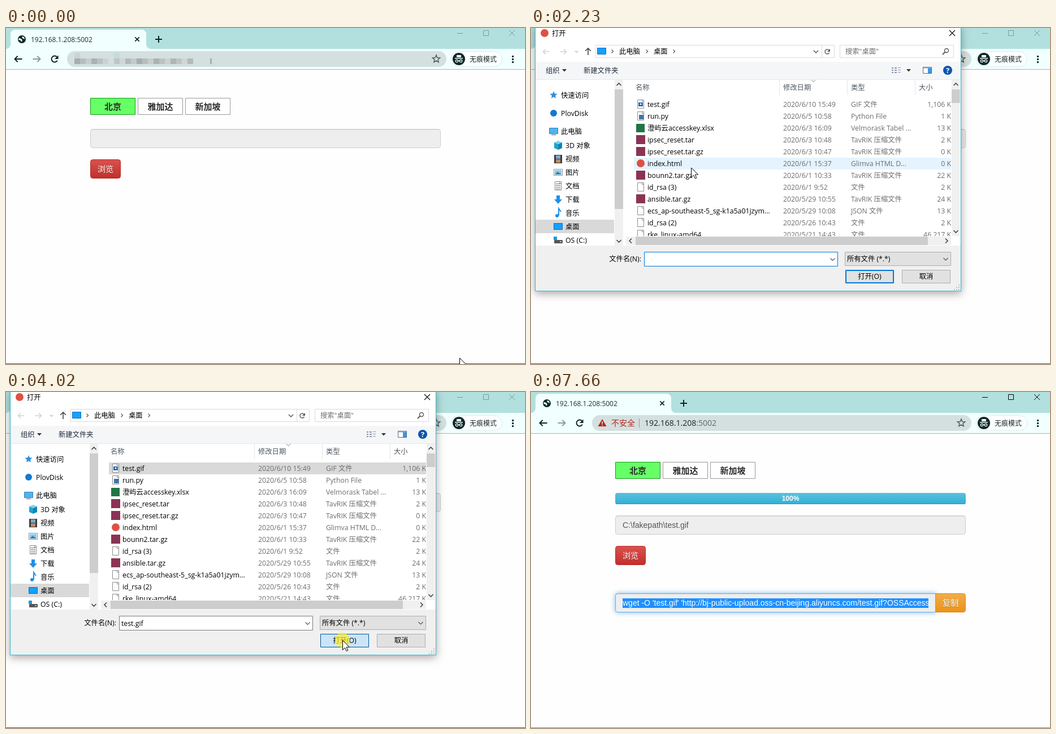
An HTML page with a canvas that plays this animation: 918x596 px, repeating every 8 s.

```html
<!DOCTYPE html>
<html lang="zh">
<head>
<meta charset="utf-8">
<style>
html, body { margin: 0; width: 100%; height: 100%; overflow: hidden; background: #fefefe; }
canvas { display: block; }
</style>
</head>
<body>
<canvas id="stage" width="918" height="596"></canvas>
<script>
const g = document.getElementById('stage').getContext('2d');
const UI = '"Open Sans", "Noto Sans CJK SC", "Noto Sans CJK", sans-serif';
const WEB = '"Liberation Sans", "Noto Sans CJK SC", "Noto Sans CJK", sans-serif';
const LOOP = 8000;
const T = { press: 680, open: 1210, built: 1840, icons: 2000, select: 2850, confirm: 3940, close: 4100,
  upload: 5110, fill: 5260, link: 5950, copy: 6840, copied: 6970, gone: 7640 };
const PATH = [[0, 802, 585], [60, 802, 585], [510, 190, 252], [1140, 190, 252], [1740, 279, 278],
  [1980, 279, 278], [2770, 296, 150], [2850, 297, 138], [3200, 297, 138], [3800, 602, 464],
  [3960, 595, 440], [4100, 595, 440], [4400, 598, 457], [6090, 598, 457], [6420, 683, 419],
  [6800, 738, 374], [7080, 738, 374], [7600, 715, 452], [LOOP, 715, 452]];
const CLICKS = [[680, 940], [2850, 3220], [3940, 4150], [6840, 7020]];

const PACK = 'TavRIK 压缩文件';
const FILES = [
  ['test.gif', '2020/6/10 15:49', 'GIF 文件', '1,106', 'image'],
  ['run.py', '2020/6/5 10:58', 'Python File', '1', 'script'],
  ['澄屿云accesskey.xlsx', '2020/6/3 16:09', 'Velmorask Tabel ...', '13', 'sheet'],
  ['ipsec_reset.tar', '2020/6/3 10:48', PACK, '2', 'pack'],
  ['ipsec_reset.tar.gz', '2020/6/3 10:47', PACK, '0', 'pack'],
  ['index.html', '2020/6/1 15:37', 'Glimva HTML D...', '0', 'web'],
  ['bounn2.tar.gz', '2020/6/1 10:33', PACK, '22', 'pack'],
  ['id_rsa (3)', '2020/6/1 9:52', '文件', '2', 'page'],
  ['ansible.tar.gz', '2020/5/29 10:55', PACK, '24', 'pack'],
  ['ecs_ap-southeast-5_sg-k1a5a01jzym...', '2020/5/29 10:08', 'JSON 文件', '13', 'page'],
  ['id_rsa (2)', '2020/5/26 10:43', '文件', '2', 'page'],
  ['rke_linux-amd64', '2020/5/21 14:43', '文件', '46,217', 'page']];
const PLACES = [['快速访问', 'star'], ['PlovDisk', 'cloud'], ['此电脑', 'screen'], ['3D 对象', 'cube'],
  ['视频', 'film'], ['图片', 'photo'], ['文档', 'doc'], ['下载', 'down'], ['音乐', 'note'],
  ['桌面', 'desk'], ['OS (C:)', 'disk'], ['WORK (D:)', 'disk'], ['网络', 'screen']];

const clamp = v => Math.max(0, Math.min(1, v));

function box(x, y, w, h, fill, stroke, r = 0) {
  const i = stroke ? .5 : 0;
  g.beginPath();
  g.roundRect(x + i, y + i, w - 2 * i, h - 2 * i, r);
  if (fill) { g.fillStyle = fill; g.fill(); }
  if (stroke) { g.strokeStyle = stroke; g.lineWidth = 1; g.stroke(); }
}
function disc(x, y, r, fill) {
  g.beginPath();
  g.arc(x, y, r, 0, 7);
  g.fillStyle = fill;
  g.fill();
}
function trace(pts) {
  g.beginPath();
  for (let i = 0; i < pts.length; i += 2) g.lineTo(pts[i], pts[i + 1]);
}
function line(color, width, ...pts) {
  trace(pts);
  g.strokeStyle = color;
  g.lineWidth = width;
  g.stroke();
}
function poly(color, ...pts) {
  trace(pts);
  g.closePath();
  g.fillStyle = color;
  g.fill();
}
function text(s, x, y, color = '#000', size = 12.3, font = UI, weight = 400, align = 'left') {
  g.font = `${weight} ${size}px ${font}`;
  g.textAlign = align;
  g.fillStyle = color;
  g.fillText(s, x, y);
}
function chevron(x, y, dx, dy, s, color, w = 1.2) {
  const bx = x - dx * s / 2, by = y - dy * s / 2;
  line(color, w, bx + dy * s, by + dx * s, x + dx * s / 2, y + dy * s / 2, bx - dy * s, by - dx * s);
}
function cross(x, y, s, color, w) {
  line(color, w, x - s, y - s, x + s, y + s);
  line(color, w, x - s, y + s, x + s, y - s);
}
function arrow(x, y, dx, dy, s, color, w) {
  line(color, w, x - dx * s, y - dy * s, x + dx * s, y + dy * s);
  chevron(x + dx * s * .6, y + dy * s * .6, dx, dy, s * .8, color, w);
}
function reload(x, y, r, color, w) {
  g.beginPath();
  g.arc(x, y, r, .5, 5.5);
  g.strokeStyle = color;
  g.lineWidth = w;
  g.stroke();
  poly(color, x + r + 1, y - r - 1, x + r + 1, y, x, y);
}
function star(x, y, r, fill, stroke) {
  const pts = [];
  for (let i = 0; i < 10; i++) {
    const a = i * Math.PI / 5 - Math.PI / 2, q = i % 2 ? r * .45 : r;
    pts.push(x + q * Math.cos(a), y + q * Math.sin(a));
  }
  if (fill) poly(fill, ...pts);
  else line(stroke, 1.6, ...pts, ...pts.slice(0, 4));
}
function shade(y, h, a, b, from = 0) {
  const s = g.createLinearGradient(0, y - from, 0, y + h - from);
  s.addColorStop(0, a);
  s.addColorStop(1, b);
  return s;
}
function clipped(x, y, w, h, draw) {
  g.save();
  g.beginPath();
  g.rect(x, y, w, h);
  g.clip();
  draw();
  g.restore();
}

function cursorAt(t) {
  const i = PATH.findIndex((p, k) => t < PATH[k + 1][0]);
  const [t0, x0, y0] = PATH[i], [t1, x1, y1] = PATH[i + 1];
  const u = (t - t0) / (t1 - t0), e = u * u * (3 - 2 * u);
  return { x: x0 + (x1 - x0) * e, y: y0 + (y1 - y0) * e };
}
const inside = (c, x, y, w, h) => c.x >= x && c.x < x + w && c.y >= y && c.y < y + h;

function browser(active, secure) {
  const ink = '#062523';
  box(0, 0, 918, 37, '#b2e0de');
  g.beginPath();
  g.moveTo(0, 37);
  g.arcTo(8, 37, 8, 29, 8);
  g.arcTo(8, 3, 16, 3, 8);
  g.arcTo(248, 3, 248, 11, 8);
  g.arcTo(248, 37, 256, 37, 8);
  g.fillStyle = '#f1fffe';
  g.fill();
  box(0, 37, 918, 36, '#f1fffe');
  box(0, 73, 918, 1, '#a9b6b5');
  disc(28, 20, 7, ink);
  poly('#f1fffe', 23, 18, 27, 19, 29, 22, 27, 25, 26, 22, 22, 21);
  poly('#f1fffe', 28, 15, 32, 16, 33, 20, 29, 18);
  text('192.168.1.208:5002', 44, 25, '#1b3130', 12);
  cross(232, 20, 3.7, ink, 1.7);
  line(ink, 2, 264, 20, 276, 20);
  line(ink, 2, 270, 14, 270, 26);

  arrow(22, 55, -1, 0, 6.5, ink, 2);
  arrow(54, 55, 1, 0, 6.5, '#8e9b9a', 2);
  reload(86, 55, 5.5, ink, 2);
  box(108, 41, 671, 28, '#d4e0df', null, 14);
  if (secure) {
    poly('#b3261e', 126, 48, 133.5, 61, 118.5, 61);
    box(125.2, 52.5, 1.6, 4, '#fff');
    box(125.2, 58, 1.6, 1.6, '#fff');
    text('不安全', 142, 60, '#b3261e', 14);
    box(191, 47, 1, 16, '#8f9c9b');
    text('192.168.1.208', 201, 60, '#182423', 14);
    const w = g.measureText('192.168.1.208').width;
    text(':5002', 201 + w, 60, '#5d6968', 14);
  } else {
    for (let i = 0; i < 21; i++) {
      const v = 168 + (i * 37 % 11) * 4;
      if (i !== 6) box(121 + i * 10, 54, 10, 10, `rgb(${v},${v + 5},${v + 6})`);
    }
    box(121, 44, 10, 10, '#c8d5d4');
    box(191, 44, 10, 10, '#c3dcd9');
    box(361, 54, 3, 10, '#a5afaf');
  }
  star(761, 55, 7, null, '#56605f');
  box(787, 41, 91, 28, '#fbffff', '#dcebea', 14);
  disc(801, 55, 11, '#0a2b29');
  box(797, 48, 8, 4, '#fff', null, 1);
  box(794, 53, 14, 1.5, '#fff');
  for (const x of [797.5, 804.5]) {
    disc(x, 58.5, 2.8, '#fff');
    disc(x, 58.5, 1.6, '#0a2b29');
  }
  box(799, 57.7, 4, 1.2, '#fff');
  text('无痕模式', 820, 60, '#1b2827', 12);
  for (const y of [50.5, 55.5, 60.5]) disc(896.5, y, 1.7, ink);

  const c = active ? '#000' : '#7f9897';
  box(798, 9, 10, 1, c);
  box(844, 4, 10, 10, null, c);
  cross(895, 9, 5, c, 1);
  box(0, 595, 918, 1, active ? '#8d9090' : '#555');
}

function field(x, y, w, corners, focus) {
  if (focus) {
    g.save();
    g.shadowColor = 'rgba(102,175,233,.8)';
    g.shadowBlur = 8;
    box(x, y, w, 34, '#eee', '#66afe9', corners);
    g.restore();
  }
  box(x, y, w, 34, '#eee', focus ? '#66afe9' : '#ccc', corners);
  box(x + 2, y + 1, w - 4, 1, 'rgba(0,0,0,.07)');
}
function button(label, x, y, a, b, edge, hot, corners) {
  box(x, y, 54, 34, shade(y, 34, a, b, hot ? 15 : 0), edge, corners);
  text(label, x + 13, y + 23, 'rgba(0,0,0,.25)', 14, WEB);
  text(label, x + 13, y + 22, '#fff', 14, WEB);
}

function page(t, c) {
  const uploading = t >= T.upload, top = uploading ? 219 : 179;
  ['北京', '雅加达', '新加坡'].forEach((city, i) => {
    const x = 149 + i * 84;
    box(x, 124, 80, 30, i ? '#fff' : '#66ff66', i ? '#999' : '#129a12');
    text(city, x + 40, 145, '#2b2b2b', 15, UI, 700, 'center');
  });
  field(149, top, 620, 4);
  const focused = t >= T.press && t < T.copy;
  if (focused) box(148, top + 53, 56, 36, '#7fb2f0', null, 4);
  button('浏览', 149, top + 54, '#d9534f', '#c12e2a', focused ? '#4a5c9c' : '#b92c28',
    focused || inside(c, 149, top + 54, 54, 34), 4);
  if (!uploading) return;

  text('C:\\fakepath\\test.gif', 162, 241, '#555', 14, WEB);
  box(149, 179, 620, 20, shade(179, 20, '#e9e9e9', '#f5f5f5'), null, 4);
  box(151, 179, 616, 1, '#dcdcdc');
  const done = clamp((t - T.fill) / 900), w = 620 * done;
  if (w > 0) clipped(149, 179, w, 20, () => {
    box(149, 179, 620, 20, shade(179, 20, '#5bc0de', '#31b0d5'), null, 4);
    box(150, 198, 618, 1, '#2a96b6');
    text(Math.round(done * 100) + '%', 149 + w / 2, 193, '#fff', 12, WEB, 700, 'center');
  });
  if (t < T.link) return;

  const copied = t >= T.copied;
  field(149, 357, 567, [4, 0, 0, 4], copied);
  if (copied) box(162, 366, 541, 17, '#1e90ff');
  clipped(162, 358, 541.5, 32, () => text(
    "wget -O 'test.gif' 'http://bj-public-upload.oss-cn-beijing.aliyuncs.com/test.gif?OSSAccessKeyId=",
    162, 379, copied ? '#fff' : '#555', 14, WEB));
  button('复制', 715, 357, '#f0ad4e', '#eb9316', '#e38d13',
    t < T.gone && inside(c, 715, 357, 54, 34), [0, 4, 4, 0]);
}

function icon(kind, x, y) {
  const sheet = () => {
    box(x - 6, y - 8, 12, 16, '#fff', '#8b8b8b');
    line('#8b8b8b', 1, x + 2.5, y - 7.5, x + 2.5, y - 4.5, x + 5.5, y - 4.5);
  };
  const blue = '#1e90e8';
  switch (kind) {
    case 'page': sheet(); break;
    case 'image': sheet(); box(x - 4, y - 3, 8, 7, '#2368b8'); disc(x, y, 1.5, '#fff'); break;
    case 'script': sheet(); box(x - 3, y - 2, 8, 8, '#3b76a8'); break;
    case 'sheet': box(x - 8, y - 7, 15, 15, '#1f7546'); break;
    case 'pack': box(x - 8, y - 8, 16, 16, '#8b3354'); break;
    case 'web': disc(x, y, 7, '#dd5144'); break;
    case 'star': star(x, y, 7, '#2d8fd9'); break;
    case 'cloud': disc(x, y, 6, '#1479cf'); break;
    case 'screen':
      box(x - 8, y - 6, 16, 11, '#4db5f5', '#3a7ba8');
      box(x - 4, y + 6, 8, 1, '#556');
      break;
    case 'desk': box(x - 8, y - 6, 16, 12, '#14a0ff', '#0b6fc0'); break;
    case 'cube':
      poly('#7fd3ea', x - 7, y - 5, x, y - 8, x + 7, y - 5, x, y - 2);
      poly('#1fa3cf', x - 7, y - 5, x, y - 2, x, y + 8, x - 7, y + 5);
      poly('#1583b3', x + 7, y - 5, x, y - 2, x, y + 8, x + 7, y + 5);
      break;
    case 'film':
      box(x - 7, y - 7, 14, 15, '#3c3c3c');
      box(x - 4, y - 6, 8, 6, '#7fa6c8');
      box(x - 4, y + 1, 8, 6, '#b98b6a');
      break;
    case 'photo':
      box(x - 8, y - 6, 16, 12, '#fff', '#8b8b8b');
      box(x - 6, y - 4, 12, 8, '#8cc8f0');
      poly('#3c7f9f', x - 6, y + 4, x - 1, y - 1, x + 6, y + 4);
      break;
    case 'doc':
      sheet();
      for (let i = -4; i < 6; i += 3) box(x - 4, y + i, 8, 1, '#60798f');
      break;
    case 'down': poly(blue, x - 3, y - 7, x + 3, y - 7, x + 3, y, x + 7, y, x, y + 8, x - 7, y, x - 3, y); break;
    case 'note': disc(x - 2, y + 5, 3, blue); line(blue, 2, x + 1, y + 5, x + 1, y - 8, x + 5, y - 2); break;
    case 'disk':
      box(x - 7, y, 15, 6, '#555', null, 1);
      box(x + 3, y + 2, 3, 2, '#7fe07f');
      box(x - 8, y - 6, 6, 6, '#1a9be0');
  }
}

function sidebar(built, icons) {
  clipped(8, 92, 140, 294, () => PLACES.forEach(([name, kind], i) => {
    const child = i > 2 && i < 12;
    const y = (i < 3 ? 119 + 32 * i : 136 + 24 * i) - (built ? 0 : 41) + (i === 12 ? 7 : 0);
    if (kind === 'desk') box(8, y - 12, 139, 24, '#d9d9d9');
    if (icons || kind === 'desk') icon(kind, child ? 48 : 40, y);
    else if (kind === 'disk') icon('page', 48, y);
    text(name, child ? 61 : 53, y + 5);
  }));
  box(148, 92, 15, 294, '#f0f0f0');
  box(148, 109, 15, 212, '#cdcdcd');
  chevron(155.5, 100, 0, -1, 4, '#444', 1.6);
  chevron(155.5, 378, 0, 1, 4, '#444', 1.6);
}

function fileList(t, c, built, icons) {
  const top = built ? 125 : 124;
  for (const x of [439, 559, 679]) box(x, 92, 1, 27, '#e5e5e5');
  chevron(499.5, 94, 0, -1, -3.5, '#777', 1);
  [['名称', 185], ['修改日期', 446], ['类型', 566], ['大小', 686]].forEach(
    ([s, x]) => text(s, x, top - 15, '#4c5561'));
  clipped(168, 92, 575, 277, () => FILES.forEach(([name, date, type, size, kind], i) => {
    const y = top + i * 21;
    const hover = inside(c, 182, y, 561, 21);
    if (!i && t >= T.select) box(182, y, 561, 21, t < T.confirm ? '#cce8ff' : '#d9d9d9');
    else if (hover) box(182, y, 561, 21, '#e5f3ff');
    icon(icons || kind === 'pack' ? kind : 'page', 194, y + 10);
    text(name, 206, y + 15);
    text(date, 446, y + 15, '#6d6d6d');
    text(type, 566, y + 15, '#6d6d6d');
    text(size + ' KB', 751, y + 15, '#6d6d6d', 12.3, UI, 400, 'right');
  }));
  box(744, 92, 15, 277, '#f0f0f0');
  box(744, 109, 15, 24, '#cdcdcd');
  chevron(751.5, 100, 0, -1, 4, '#444', 1.6);
  chevron(751.5, 361, 0, 1, 4, '#444', 1.6);
  box(168, 370, 575, 15, '#f0f0f0');
  box(185, 370, 517, 15, '#cdcdcd');
  chevron(176, 377.5, -1, 0, 4, '#444', 1.6);
  chevron(735, 377.5, 1, 0, 4, '#444', 1.6);
}

function toolbars() {
  arrow(27, 42, -1, 0, 5.5, '#cfcfcf', 1.4);
  arrow(57, 42, 1, 0, 5.5, '#cfcfcf', 1.4);
  chevron(80.5, 42, 0, 1, 2.5, '#bbb');
  arrow(101, 42, 0, -1, 6, '#444', 1.6);
  box(114, 30, 423, 23, '#fff', '#d9d9d9');
  icon('desk', 125, 41);
  text('此电脑', 156, 46);
  text('桌面', 217, 46);
  for (const x of [144, 205, 253]) chevron(x, 41.5, 1, 0, 3, '#555');
  chevron(504, 42, 0, 1, 4, '#555', 1.5);
  box(514, 31, 1, 21, '#d9d9d9');
  reload(524, 42, 4, '#555', 1.4);
  box(546, 30, 202, 23, '#fff', '#d9d9d9');
  text('搜索"桌面"', 556, 46, '#6d6d6d');
  g.beginPath();
  g.arc(735, 40, 3.5, 0, 7);
  g.strokeStyle = '#555';
  g.lineWidth = 1.4;
  g.stroke();
  line('#555', 1.8, 732.5, 42.5, 728, 47);
  text('组织', 26, 80, '#1e2a3c');
  poly('#333', 55, 73, 63, 73, 59, 77.5);
  text('新建文件夹', 93, 80, '#1e2a3c');
  for (let y = 70; y < 81; y += 4) {
    box(638, y, 3, 2, '#8a97a8');
    box(643, y, 4, 2, '#8a97a8');
    box(649, y, 5, 1, '#8a97a8');
  }
  poly('#333', 664, 73, 672, 73, 668, 77.5);
}

function pushButton(label, x, fill, edge, thick) {
  box(x, 429, 86, 24, fill, edge);
  if (thick) box(x + 1, 430, 84, 22, null, edge);
  text(label, x + 43, 445, '#000', 12.3, UI, 400, 'center');
}
function footer(t, c, built) {
  box(8, 386, 752, 80, '#f0f0f0');
  if (!built) {
    [[138, 401, 57, 17], [200, 397, 343, 26], [555, 397, 188, 25], [555, 428, 88, 26],
      [655, 428, 88, 26], [743, 449, 17, 17]].forEach(r => box(...r, '#fff'));
    return;
  }
  const pressed = t >= T.confirm, chosen = t >= T.select;
  text('文件名(N):', 195, 414, '#000', 12.3, UI, 400, 'right');
  box(200, 397, 343, 26, '#fff', chosen ? '#7a7a7a' : '#0078d7');
  if (chosen) text('test.gif', 204, 415);
  chevron(533.5, 410.5, 0, 1, 4, '#555');
  box(555, 397, 188, 25, '#e1e1e1', '#adadad');
  text('所有文件 (*.*)', 559, 414);
  chevron(733.5, 410, 0, 1, 4, '#555');
  const hover = inside(c, 556, 429, 86, 24);
  pushButton('打开(O)', 556, pressed ? '#cce4f7' : hover ? '#e5f1fb' : '#e1e1e1',
    pressed ? '#005499' : '#0078d7', !pressed);
  pushButton('取消', 656, '#e1e1e1', '#adadad');
  for (let i = 0; i < 3; i++)
    for (let j = 0; j <= i; j++) box(756 - j * 4, 455 + i * 4, 2, 2, '#bdbdbd');
}

function dialog(t, c) {
  const built = t >= T.built, icons = t >= T.icons;
  g.save();
  g.globalAlpha = t < T.close ? clamp((t - T.open) / 150) : clamp(1 - (t - T.close) / 150);
  g.save();
  g.shadowColor = 'rgba(0,0,0,.35)';
  g.shadowBlur = 14;
  g.shadowOffsetY = 4;
  box(7, -5, 754, 472, '#3db4c8');
  g.restore();
  box(8, 0, 752, 466, '#fff');
  disc(24, 9, 7, '#dd5144');
  text('打开', 37, 14);
  cross(745, 9, 5, '#111', 1.2);
  box(8, 60, 752, 31, '#f5f6f7');
  box(8, 91, 752, 1, '#e8e8e8');
  if (built) toolbars();
  box(693, 69, 16, 12, '#fff', '#5b6b7c');
  box(694, 70, 14, 2, '#b9c6d3');
  box(702, 71, 6, 9, '#3b96e0');
  disc(737, 75, 8, '#0b55ad');
  text('?', 737, 80, '#fff', 13, UI, 700, 'center');
  sidebar(built, icons);
  fileList(t, c, built, icons);
  footer(t, c, built);
  g.restore();
}

function pointer({ x, y }) {
  const pts = [0, 0, 0, 17, 4, 13.2, 6.8, 19, 9.3, 18, 6.7, 12.2, 12, 12];
  g.save();
  g.translate(x + .5, y + .5);
  poly('#fff', ...pts);
  line('#000', 1, ...pts, 0, 0);
  g.restore();
}

function frame(now) {
  const t = now % LOOP, c = cursorAt(t);
  box(0, 0, 918, 596, '#fefefe');
  const closed = t >= T.close + 100;
  browser(closed || (t >= T.press && t < T.open), closed);
  page(t, c);
  if (t >= T.open && t < T.close + 150) dialog(t, c);
  if (CLICKS.some(([a, b]) => t >= a && t < b)) disc(c.x, c.y, 13, 'rgba(255,238,40,.7)');
  if (t < T.gone) pointer(c);
  requestAnimationFrame(frame);
}
requestAnimationFrame(frame);
</script>
</body>
</html>
```
